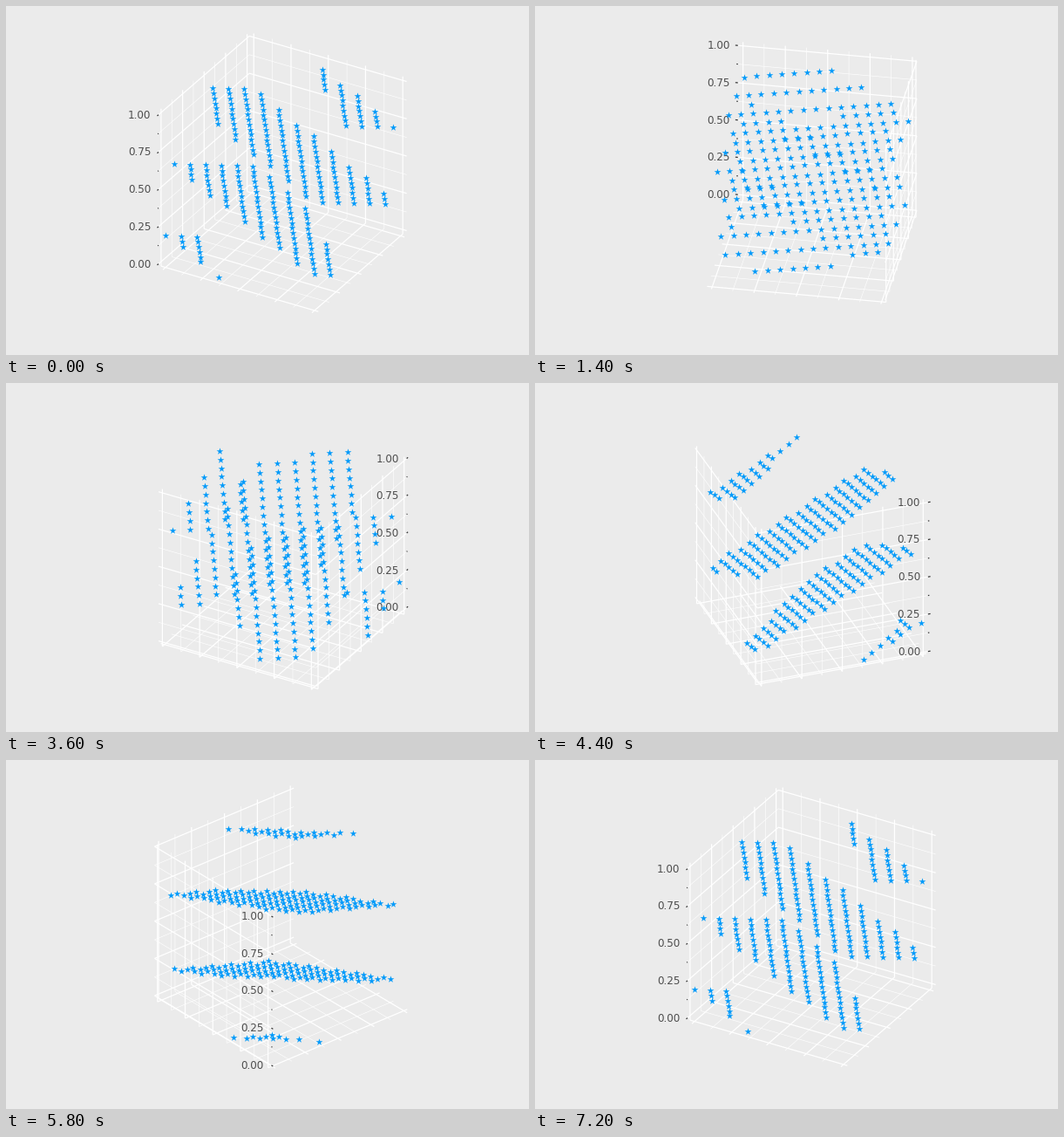
A matplotlib script for the animation above (7.4 s loop, 600 by 400 pixels).

```python
import numpy as np
import matplotlib.pyplot as plt
from matplotlib.animation import FuncAnimation
from matplotlib.collections import LineCollection

W, H, DPI = 600, 400, 100
FRAMES, INTERVAL = 37, 200
PX = 72 / DPI                       # points per pixel
CENTER = np.array([317.3, 191.4])   # box centre on the stage
HALF = 104.2                        # half the box edge, in pixels
ELEV = np.radians(30)

# Full-period generator: consecutive triples fall on a few planes
M, A, C = 256, 45, 1
x = np.arange(M)
y = (A * x + C) % M
z = (A * y + C) % M
points = np.column_stack([x, y, z]) / M

span = (M - 1) / M
LO, HI = -0.03 * span, 1.03 * span
MAJOR = np.arange(5) / 4
MINOR = MAJOR[:-1] + 0.125


def project(p, azimuth):
    """Orthographic projection of data points to stage pixels."""
    q = (np.asarray(p) - (LO + HI) / 2) * 2 * HALF / (HI - LO)
    c, s = np.cos(azimuth), np.sin(azimuth)
    depth = q[..., 1] * c - q[..., 0] * s
    across = q[..., 0] * c + q[..., 1] * s
    up = q[..., 2] * np.cos(ELEV) + depth * np.sin(ELEV)
    return CENTER + np.stack([across, -up], axis=-1)


def grid(values):
    """Lines on the floor, the x = LO wall and the y = HI wall."""
    lines = []
    for v in values:
        lines += [
            [(v, LO, LO), (v, HI, LO)], [(v, HI, LO), (v, HI, HI)],
            [(LO, v, LO), (HI, v, LO)], [(LO, v, LO), (LO, v, HI)],
            [(LO, LO, v), (LO, HI, v)], [(LO, HI, v), (HI, HI, v)],
        ]
    return np.array(lines)


def ticks(values, size):
    return np.array([[(LO, LO, v), (LO, LO - size, v)] for v in values])


fig = plt.figure(figsize=(W / DPI, H / DPI), dpi=DPI, facecolor="#ebebeb")
ax = fig.add_axes([0, 0, 1, 1])
ax.set_xlim(0, W)
ax.set_ylim(H, 0)
ax.axis("off")


def add_lines(color, width, order):
    lines = LineCollection([], colors=color, linewidths=width * PX, zorder=order)
    lines.set_snap(False)
    return ax.add_collection(lines)


line_sets = [
    (grid(MINOR), add_lines("white", 0.6, 1)),
    (grid(MAJOR), add_lines("white", 1.25, 2)),
    (ticks(MINOR, 0.008), add_lines("#333333", 1.2, 3)),
    (ticks(MAJOR, 0.015), add_lines("#333333", 1.2, 3)),
]
labels = [
    ax.text(0, 0, f"{v:.2f}", family="DejaVu Sans", size=12 * PX,
            color="#4d4d4d", ha="right", va="center", zorder=4)
    for v in MAJOR
]
stars = ax.scatter(x, y, s=(8.2 * PX) ** 2, marker="*", color="#009afa",
                   linewidths=0, zorder=5)
stars.set_snap(False)


def draw(i):
    azimuth = np.radians(30 + 10 * i)
    for ends, lines in line_sets:
        lines.set_segments(project(ends, azimuth))
    for v, label in zip(MAJOR, labels):
        px, py = project((LO, LO, v), azimuth)
        label.set_position((px - 8.8, py + 0.5))
    stars.set_offsets(project(points, azimuth))
    return [lines for _, lines in line_sets] + labels + [stars]


anim = FuncAnimation(fig, draw, frames=FRAMES, interval=INTERVAL, repeat=True)
plt.show()
```
